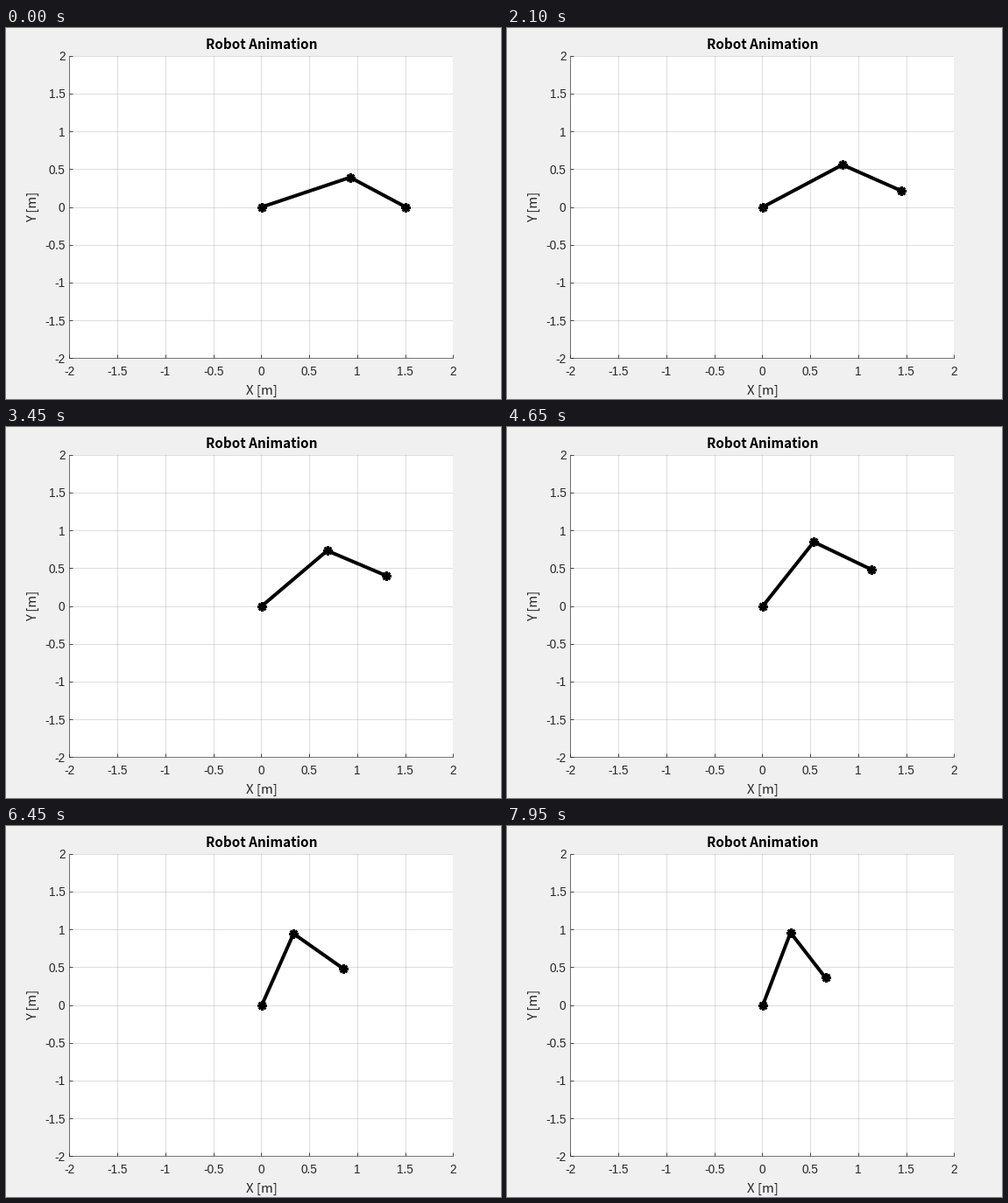
These frames come from a looping animation (565x424 px, 8000 ms). A matplotlib script:

```python
import numpy as np
import matplotlib.pyplot as plt
from matplotlib.animation import FuncAnimation
from matplotlib.path import Path
from matplotlib.transforms import offset_copy

W, H, DPI = 565, 424, 100
PX = 72 / DPI                      # points per pixel
LEFT, RIGHT, TOP, BOTTOM = 72.45, 510.3, 31.8, 377.36
L1, L2 = 1.0, 0.7
FRAMES, STEP_MS, HOLD = 160, 50, 9
INK = "#262626"
TICK_FONT, LABEL_FONT = "Liberation Sans", "Noto Sans CJK JP"

fig = plt.figure(figsize=(W / DPI, H / DPI), dpi=DPI, facecolor="#f0f0f0")
ax = fig.add_axes([LEFT / W, 1 - BOTTOM / H, (RIGHT - LEFT) / W, (BOTTOM - TOP) / H])
ax.set(xlim=(-2, 2), ylim=(-2, 2))
ticks = np.arange(-2, 2.1, 0.5)
ax.set_xticks(ticks)
ax.set_yticks(ticks)
ax.tick_params(direction="in", length=4.4 * PX, width=0.8 * PX, color=INK,
               labelbottom=False, labelleft=False)
ax.grid(color=INK, alpha=0.15, linewidth=1 * PX)
ax.set_axisbelow(True)
for side, spine in ax.spines.items():
    spine.set_visible(side in ("left", "bottom"))
    spine.set(color=INK, linewidth=0.6 * PX)


def label(x, y, s, size, font, **kw):
    """Text with its baseline at pixel (x, y), counted from the top left."""
    opts = dict(ha="center", va="baseline", color=INK) | kw
    fig.text(x / W, 1 - y / H, s, fontsize=size * PX, family=font, **opts)


for v in ticks:
    f = (v + 2) / 4
    label(LEFT + f * (RIGHT - LEFT), 397, f"{v:g}", 13.6, TICK_FONT)
    label(67.5, BOTTOM - f * (BOTTOM - TOP) + 5.4, f"{v:g}", 13.6, TICK_FONT, ha="right")
label(291.7, 24, "Robot Animation", 15.2, LABEL_FONT, weight="bold", color="black")
label(291.5, 419, "X [m]", 14.9, LABEL_FONT)
label(38.5, 204.5, "Y [m]", 14.9, LABEL_FONT, rotation=90, ha="right", va="center")


def star():
    """Four crossing strokes."""
    pts = []
    for a in np.arange(4) * np.pi / 4:
        d = np.array([np.cos(a), np.sin(a)])
        pts += [-d, d]
    return Path(pts, [Path.MOVETO, Path.LINETO] * 4)


# The arm sits a fraction of a pixel right of the pixel-snapped grid.
shifted = offset_copy(ax.transData, fig, x=0.7 * PX, units="points")
arm, = ax.plot([], [], color="black", linewidth=4 * PX, solid_joinstyle="miter",
               solid_capstyle="butt", clip_on=False, zorder=5, transform=shifted)
joints, = ax.plot([], [], linestyle="none", marker=star(), markersize=11 * PX,
                  markeredgewidth=3 * PX, color="black", zorder=6, transform=shifted)


def pose(n):
    """Joints while the tip follows a circle; the shoulder lags at the start."""
    phi = np.radians(0.893 * n)
    x, y = 1 + 0.5 * np.cos(phi), 0.5 * np.sin(phi)
    d2 = x * x + y * y
    elbow = -np.arccos((d2 - L1**2 - L2**2) / (2 * L1 * L2))
    shoulder = np.arctan2(y, x) + np.arccos((d2 + L1**2 - L2**2) / (2 * L1 * np.sqrt(d2)))
    shoulder -= np.radians(6.2 * np.exp(-0.05 * n) * np.sin(0.0483 * n))
    ex, ey = L1 * np.cos(shoulder), L1 * np.sin(shoulder)
    tip = shoulder + elbow
    return [0, ex, ex + L2 * np.cos(tip)], [0, ey, ey + L2 * np.sin(tip)]


def draw(k):
    pts = pose(max(0, k - HOLD))
    arm.set_data(*pts)
    joints.set_data(*pts)
    return arm, joints


anim = FuncAnimation(fig, draw, frames=FRAMES, interval=STEP_MS, repeat=True,
                     repeat_delay=0, blit=False)
plt.show()
```
